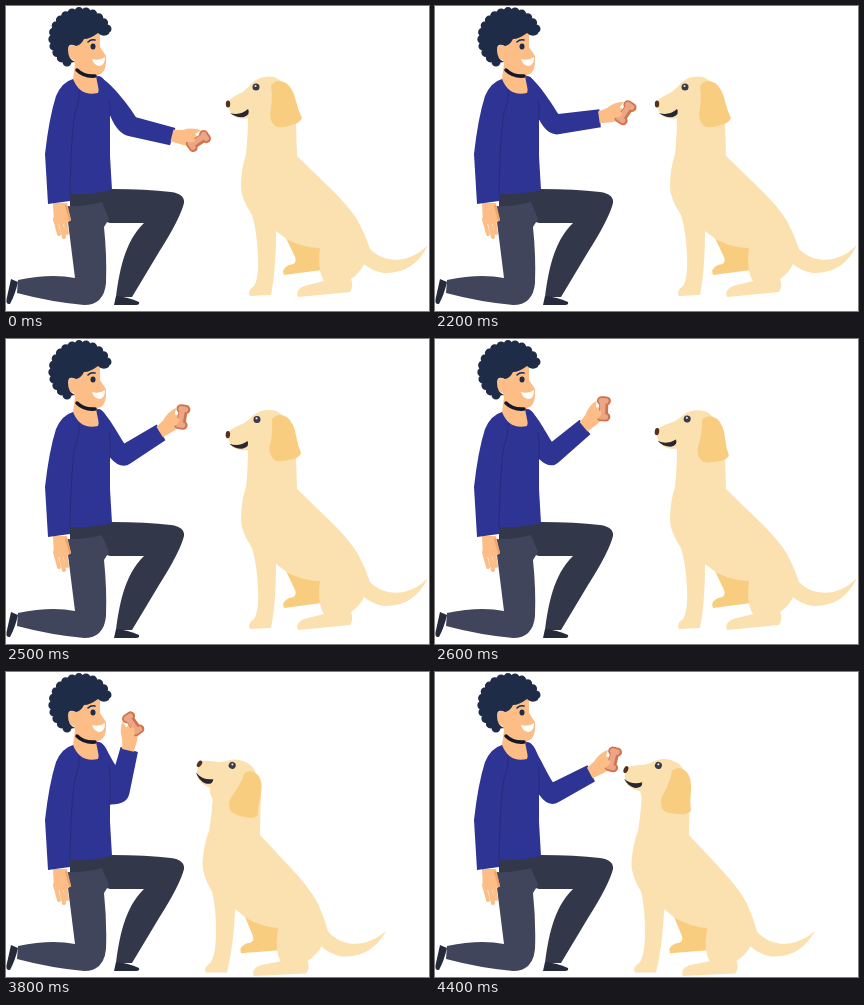
An HTML page that plays this animation: 423x305 px, repeating every 5400 ms.

```html
<!DOCTYPE html>
<html lang="en">
<head>
<meta charset="utf-8">
<title>Dog training</title>
<style>
html, body { margin: 0; width: 100%; height: 100%; overflow: hidden; background: #fff; }
svg { display: block; width: 100vw; height: 100vh; }
.skin { fill: #fcbd86; }
.hair { fill: #1f2c47; }
.shirt { fill: #2e3493; }
.shoe { fill: #262b3b; }
.fur { fill: #fbe0b0; }
.ear { fill: #f8cd80; }
.line { fill: none; stroke-linecap: round; stroke-linejoin: round; }
</style>
</head>
<body>
<svg viewBox="0 0 423 305">
  <g id="person">
    <!-- legs and shoes -->
    <path fill="#33374a" d="M64 187L106 183Q140 183 165 186Q179 188 178 197Q174 213 153 246L126 291H110C113 268 118 236 138 217H104L64 205Z"/>
    <path fill="#40455b" d="M60 200Q78 201 96 196L103 213L98 221Q101 250 100 277Q98 299 78 299Q45 296 11 287L12 274Q45 267 69 272Z"/>
    <path class="shoe" d="M5 273L12 276Q9 289 4 298Q-1 299 1 291Z"/>
    <path class="shoe" d="M110 290Q122 291 133 296Q134 299 130 299H108Z"/>
    <!-- resting hand -->
    <path class="skin" d="M47 197H61L65 214L60 218H48Z"/>
    <path class="line" stroke="#fcbd86" stroke-width="4" d="M49 213L53 228M54 213L58 231M59 213L61 227"/>
    <path class="line" stroke="#f3a268" stroke-width="2" d="M60 200L64 214"/>
    <!-- neck and torso -->
    <path class="shirt" d="M67 73L92 70Q99 70 104 87V150L106 184Q86 189 64 188V195L42 198L39 148Q43 112 50 90Q56 76 67 73Z"/>
    <path class="skin" d="M69 58H92V71Q94 82 92 87Q74 91 67 73Z"/>
    <path class="line" stroke="#272a7c" d="M73 85Q74 94 69 107Q65 130 64 188"/>
    <!-- face and curls -->
    <path class="skin" d="M68 30L94 26V41L100 50Q101 64 95 68Q85 72 76 66Q69 62 68 54Q61 52 62 43Q64 37 69 40Z"/>
    <path class="line" stroke="#15182a" stroke-width="3.5" d="M71 64Q78 71 89 70"/>
    <path class="hair" d="M62 57A28 27 0 1 1 103 28Q97 32 92 27Q84 33 78 33Q75 39 70 40Q62 36 62 44Q62 53 69 56Z"/>
    <path class="line" stroke="#1f2c47" stroke-width="9" stroke-dasharray="0 7" d="M61 56A28 27 0 1 1 102 26"/>
    <path class="line" stroke="#1f2c47" stroke-width="1.6" d="M82 36Q85 33 89 34"/>
    <ellipse class="hair" cx="87" cy="40.500" rx="2.500" ry="3"/>
    <path fill="#fff" d="M86 53Q94 55 99 51Q99 59 94 60Q88 60 86 53Z"/>
  </g>

  <path id="sleeve" class="shirt"/>
  <path id="fold" class="line" stroke="#272a7c"/>
  <g id="hand">
    <path class="skin" d="M49 -7L58 -9Q66 -14 76 -13L71 -8L76 -4L71 5Q61 6 49 5Z"/>
    <g class="line" transform="translate(76 -2) rotate(-48)">
      <path id="bone" stroke="#cf7350" stroke-width="9" d="M-8 -2.500V2.500M8 -2.500V2.500M-8 0H8"/>
      <path stroke="#eda684" stroke-width="5.500" d="M-8 -2.500V2M8 -2.500V2M-8 -1H8"/>
    </g>
    <path class="skin" d="M60 -5L70 -4Q74 -3 72 0Q69 2 60 2Z"/>
  </g>

  <g id="body">
    <path class="ear" d="M280 232L318 238L316 264L278 269Q275 263 283 259Q292 258 289 251Z"/>
    <path class="fur" d="M246 92H286Q291 105 290 118L291 150L322 180Q343 200 352 215Q359 228 364 243C378 257 402 259 422 239Q408 268 378 267Q366 265 358 258Q354 267 345 273Q348 280 344 286L292 291Q289 284 298 280L318 275Q311 264 314 242Q299 242 282 234L270 225Q270 255 267 277L265 289L244 290Q241 285 248 280Q253 272 252 250Q251 225 246 209Q235 192 235 181Q235 163 240 148Q242 130 242 108Z"/>
  </g>
  <g id="head">
    <path class="fur" d="M221 96Q229 89 237 86Q243 81 246 77Q255 69 268 71Q283 77 286 97Q286 118 266 122Q249 122 244 112Q236 114 229 111Q223 107 221 96Z"/>
    <ellipse cx="222" cy="98" rx="2.200" ry="3.600" fill="#54301f"/>
    <path fill="#272631" d="M224 107Q234 110 242 103Q245 108 238 111Q230 112 224 107Z"/>
    <circle cx="250" cy="81" r="3.500" fill="#3b3a48"/>
    <circle cx="249.500" cy="80" r="1.100" fill="#d8dbe4"/>
    <path id="ear" class="ear" d="M265 80Q270 72 280 77Q287 82 290 95Q292 104 296 112Q293 118 285 119Q278 122 271 121Q264 117 264 108Q267 93 265 80Z"/>
  </g>
</svg>
<script>
const LOOP = 5400, STEP = 100;
const LIFT = 2100, CLOSER = 3800;
const $ = id => document.getElementById(id);
const move = (id, transform) => $(id).setAttribute('transform', transform);
const ramp = (t, from, to) => Math.min(1, Math.max(0, (t - from) / (to - from)));

function draw(t) {
  const near = t >= CLOSER;
  const angle = near
    ? -77 + 49 * ramp(t, CLOSER, 4400)
    : 14 * (1 - ramp(t, 0, 200)) - 56 * ramp(t, LIFT, 2800);
  const tilt = near
    ? 34 - 10 * ramp(t, CLOSER, 4300)
    : 24 * ramp(t, 2300, 2800) ** 2;

  // The elbow drifts with the forearm; `at` maps forearm space to the stage.
  const ex = near ? 112 : 116.5 + angle * 0.12;
  const ey = (near ? 124 : 119) - angle * 0.03;
  const r = angle * Math.PI / 180, c = Math.cos(r), s = Math.sin(r);
  const at = (x, y) => [ex + x * c - y * s, ey + x * s + y * c];
  const bend = at(9 + angle * angle / 260, -10);
  const pit = ey - 7 - angle * 0.17;

  $('sleeve').setAttribute('d',
    `M90 70C99 70 ${bend[0] - 10} ${bend[1] - 16} ${bend}` +
    `L${at(50.5, -9)}L${at(49.5, 9)}L${at(8, 10)}Q${at(-4, 11)} 104 ${pit}L96 100Z`);
  $('fold').setAttribute('d', `M103 94Q105 102 104 ${pit}`);
  move('hand', `translate(${ex} ${ey}) rotate(${angle})`);

  move('body', near ? 'translate(-44 10.5) rotate(2.9 244 289)' : '');
  move('head', `translate(${near ? '225 109.5' : '258 95'}) rotate(${tilt}) translate(-258 -95)`);
  move('ear', `rotate(${-0.2 * tilt} 266 84)`);
}

const start = performance.now();
function tick() {
  const t = (performance.now() - start) % LOOP;
  draw(Math.floor(t / STEP) * STEP);
  requestAnimationFrame(tick);
}
tick();
</script>
</body>
</html>
```
